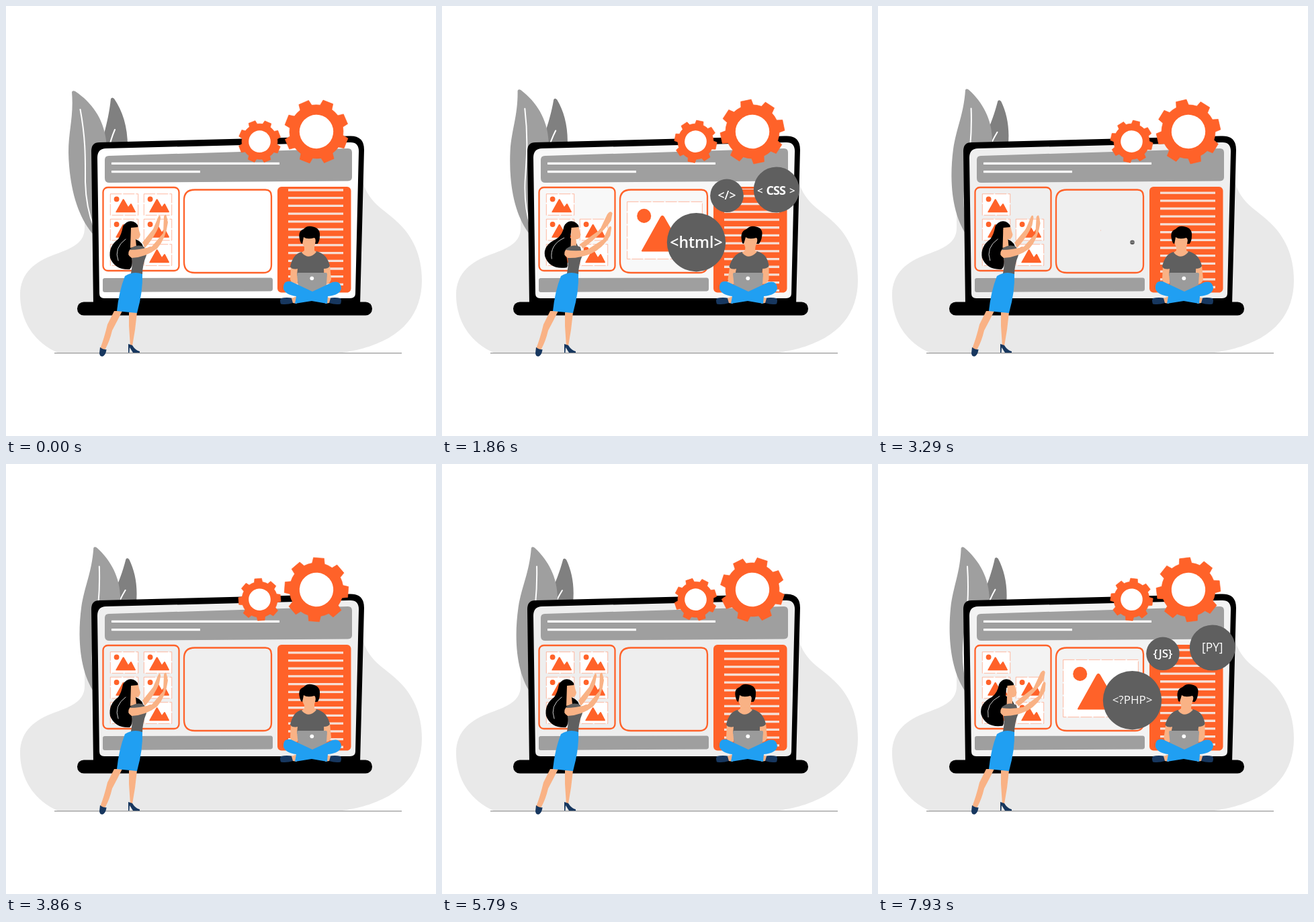
An HTML page that plays this animation: 640x640 px, repeating every 8000 ms.

```html
<!DOCTYPE html>
<html lang="en">
<head>
<meta charset="utf-8">
<title>Building a web page</title>
<style>
  html, body { margin: 0; width: 100%; height: 100%; overflow: hidden; background: #fff; }
  svg { display: block; width: 100vw; height: 100vh; --screen: #fff; }
  .screen { fill: var(--screen); }
  .orange { fill: #ff6229; }
  .grey { fill: #9f9f9f; }
  .shirt, .bubble circle { fill: #5f5f5f; }
  .skin { fill: #f9b285; }
  .blue { fill: #209ff2; }
  .navy { fill: #17375f; }
  .panel { fill: none; stroke: #ff6229; stroke-width: 2.3; }
  .vein { fill: none; stroke: #fff; stroke-width: 2; stroke-linecap: round; }
  .frame { fill: #fff; stroke: #ff9d7c; stroke-width: .7; stroke-dasharray: 17 2; vector-effect: non-scaling-stroke; }
  .bubble text { fill: #fff; text-anchor: middle; font-family: "Open Sans", "Noto Sans", sans-serif; }
  .semi { font-weight: 600; }
  .bubble .tight { font-weight: 700; letter-spacing: -.9px; }
</style>
</head>
<body>
<svg viewBox="0 0 640 640">
  <defs>
    <g id="pic">
      <rect class="frame" x="-20.7" y="-15.8" width="41.4" height="31.6"/>
      <g class="orange">
        <circle cx="-11.4" cy="-8" r="3.9"/>
        <path d="M-12.6 10.8L-2.400 -7.400Q-1.300 -9 -.2 -7.400L6 3.300L9 -.8Q10 -2 11 -.8L17 10.8Q17 11.700 16 11.700H-12Q-13.200 11.700 -12.600 10.800Z"/>
      </g>
    </g>
    <clipPath id="column"><rect x="404" y="272" width="110" height="153"/></clipPath>
  </defs>

  <path fill="#e9e9e9" d="M77 516C40 500 21 466 21 430C21 396 45 380 72 370C100 360 117 352 117 330V300L300 260L531 262C541 294 562 302 582 321C606 343 619 372 619 408C619 464 583 504 500 516Z"/>
  <path d="M72 516.6H589" stroke="#999" stroke-width="1.3"/>

  <g id="backLeaf">
    <path fill="#808080" d="M156 138Q158 135 161 138C174 157 182 182 181 215L160 270L135 240C141 200 152 178 156 138Z"/>
    <path class="vein" d="M162 184Q156 198 152 216"/>
  </g>
  <g id="frontLeaf">
    <path class="grey" d="M98 128Q99 125 103 127C127 143 145 167 149 200Q153 260 135 345C108 320 94 272 93 218C93 185 101 165 98 128Z"/>
    <path class="vein" d="M110.5 154C119 200 118 230 118 262Q119 300 131 330"/>
  </g>

  <path d="M139 203L512 193.5Q533 193 533 214L527 445H130L127 216Q127 203 139 203Z"/>
  <rect x="106" y="440.5" width="439" height="20" rx="9.8"/>
  <path class="screen" d="M149 212L511 203Q526 202 525 218L520 428Q520 435 512 435H146Q139 435 139 428L136 226Q136 212 149 212Z"/>
  <path class="grey" d="M153 223L509 212Q515 212 515 218V255Q515 260 509 260.5L153 263Q147 263 147 256V229Q147 223 153 223Z"/>
  <path d="M157 234.3H407M157 246.7H289" stroke="#fff" stroke-width="3.2"/>
  <path class="grey" d="M147 405L394 404.5Q397 404.5 397 408V421Q397 424 394 424.5L147 426Q144 426 144 423V408Q144 405 147 405Z"/>
  <rect class="panel" x="144.5" y="270" width="113" height="124" rx="7"/>
  <path class="panel" d="M281 273.5H386Q395 273.5 395 283V385Q395 397 383 397H281Q265 397 265 381V289Q265 273.5 281 273.5Z"/>
  <rect class="orange" x="404" y="269" width="109.5" height="157.5" rx="6"/>
  <g clip-path="url(#column)"><path id="lines" stroke="#f6dfd6" stroke-width="3.3"/></g>

  <g id="grid"></g>
  <g id="gears"></g>

  <!-- man -->
  <g id="man">
    <path class="skin" d="M424 387L434 389L434 413Q426 417 423 407ZM473 389L482 386L484 407Q481 416 474 413Z"/>
    <path class="shirt" d="M440 366Q451 372 462 365Q478 369 482 387Q480 391 473 391V401H433L434 391Q426 393 423 388Q427 369 440 366Z"/>
    <path class="skin" d="M444 355H459V364L462 366Q451 379 440 367L444 364Z"/>
    <ellipse class="skin" cx="451" cy="350" rx="9.7" ry="13"/>
    <path d="M439 353Q432 336 443 332Q448 326 457 328.5Q468 331 467 342Q467 350 463.5 354L460 354Q462 347 459 345Q448 348 443 344Q442 350 441 354Z"/>
  </g>
  <path fill="#9b9b9b" d="M435 397H476Q478 397 478 399L476 428H436L433 399Q433 397 435 397Z"/>
  <circle cx="455.3" cy="405.3" r="2.9" fill="#fff"/>
  <path class="navy" d="M409 435Q418 433 427 435V442Q418 445 409 443.5Q407 438 409 435ZM498 435Q489 433 481 435V442Q490 445 498 443.5Q500 438 498 435Z"/>
  <path class="skin" d="M425 435L433 432V443L427 442ZM483 435L475 432V443L481 442Z"/>
  <path class="blue" d="M424 410Q412 408 413 421Q416 430 432 432L430 443L455 439L478 443L479 432Q498 430 499 420Q498 408 486 411L456 425Z"/>

  <!-- woman -->
  <path class="skin" d="M161 454H173Q166 468 158 483Q154 500 147 512L140 510Q146 495 151 474ZM183 456H195L192 482L188 506L185 507L183 476Z"/>
  <path class="navy" d="M140 508Q146 512 149.5 511Q149 518 145 521Q140 523 139 517ZM182 503L188 505Q193 513 199 514V516H189L184 508L183.5 516H182Z"/>
  <path id="hair"/>
  <path class="vein" id="shine" style="stroke-width:.8"/>
  <path class="skin" id="backArm"/>
  <use href="#pic" id="flyer"/>
  <path class="skin" id="face" d="M186 330L197 329Q198 335 200 340Q199 348 193 347L194 358L185 360Z"/>
  <path class="shirt" d="M184 362Q196 353 206 359L209 371Q203 385 203 400Q195 401 186 398Q190 380 184 362Z"/>
  <path class="blue" d="M177 402Q190 394 203 399Q204 425 195 457L165 454Q168 425 177 402Z"/>
  <path class="skin" id="frontArm"/>

  <g id="bubbles"></g>
</svg>
<script>
const LOOP = 8000, CYCLE = 6000, SWAY = 2400;
const LINE_GAP = 11.7, SCROLL = .0048, SPIN = .0305;
const $ = id => document.getElementById(id);
const lerp = (a, b, k) => a + (b - a) * k;
const smooth = u => u * u * (3 - 2 * u);

// Eased value between [time, value] stops.
function keyed(time, stops) {
  if (time <= stops[0][0]) return stops[0][1];
  for (let i = 1; i < stops.length; i++) {
    const [t0, v0] = stops[i - 1], [t1, v1] = stops[i];
    if (time < t1) return lerp(v0, v1, smooth((time - t0) / (t1 - t0)));
  }
  return stops[stops.length - 1][1];
}

// Blend two paths that share the same commands.
function blend([from, to], k) {
  const ends = to.match(/[\d.]+/g);
  let i = 0;
  return from.replace(/[\d.]+/g, n => lerp(+n, +ends[i++], k).toFixed(2));
}

const shapes = {
  hair: [
    "M174 328Q180 318 190 321Q198 325 196 331L186 333L187 345Q202 349 204 358Q192 362 187 373Q190 386 184 392Q162 393 155 375Q152 358 167 347Q172 340 174 328Z",
    "M182 328Q187 318 197 321Q205 325 204 331L193 333L191 345Q200 350 202 358Q190 362 185 372Q188 386 186 389Q160 393 153 372Q150 356 170 347Q180 341 182 328Z"],
  shine: ["M178 347Q160 360 167 379", "M182 345Q160 355 163 376"],
  backArm: [
    "M203 352L219 332L227 313Q230 310 230 316L228 327Q221 344 207 360Z",
    "M205 355L236 333L247 310Q252 303 255 308L253 319Q242 336 210 361Z"],
  frontArm: [
    "M184 363Q200 363 217 358L234 338L235 313Q238 308 239 313L241 322Q238 346 225 361Q208 374 187 375Q179 370 184 363Z",
    "M184 363Q200 366 216 363L240 348L248 332Q252 326 253 331L251 343Q240 361 222 369Q204 376 187 375Q179 370 184 363Z"]
};

const thumb = (col, row) => [176 + col * 50, 295.5 + row * 37.5];
const home = thumb(1, 0), centre = [331.5, 334];
for (let i = 0; i < 6; i++) {
  if (i === 1) continue;
  const [x, y] = thumb(i % 2, i >> 1);
  $("grid").innerHTML += `<use href="#pic" x="${x}" y="${y}"/>`;
}

function gearPath(root, tip) {
  const at = (r, deg) => {
    const a = deg * Math.PI / 180;
    return `${(r * Math.sin(a)).toFixed(2)} ${(-r * Math.cos(a)).toFixed(2)}`;
  };
  let d = "";
  for (let a = 0; a < 360; a += 45) {
    d += `${a ? `A${root} ${root} 0 0 1 ` : "M"}${at(root, a - 13.5)}L${at(tip, a - 9.5)}L${at(tip, a + 9.5)}L${at(root, a + 13.5)}`;
  }
  return d + `A${root} ${root} 0 0 1 ${at(root, -13.5)}Z`;
}

const gears = [
  { x: 377.5, y: 201.7, root: 26.5, tip: 31.7, hole: 16.3, dir: -1 },
  { x: 462, y: 187, root: 40, tip: 48, hole: 25.2, dir: 1 }
].map(g => {
  $("gears").insertAdjacentHTML("beforeend",
    `<g><path class="orange" stroke="#ff6229" stroke-width=".6" stroke-linejoin="round" d="${gearPath(g.root, g.tip)}"/><circle r="${g.hole}" fill="#fff"/></g>`);
  return { ...g, el: $("gears").lastChild };
});

const label = (size, text, cls = "semi", x = 0, y = size * .34) =>
  `<text class="${cls}" x="${x}" y="${y}" font-size="${size}">${text}</text>`;

const bubbles = [
  { x: 424, y: 282.3, r: 24.8, stops: [[200, 0], [550, 1], [2500, 1], [2900, 0]],
    faces: [label(17.5, "&lt;/&gt;"), label(17, "{JS}")] },
  { x: 497.8, y: 273.5, r: 34, stops: [[450, 0], [850, 1], [2750, 1], [3100, 0]],
    faces: [
      label(15, "&lt;", "semi", -24.5, 6) + label(18, "CSS", "tight", -1, 7) + label(15, "&gt;", "semi", 23.5, 6),
      label(17.3, "[PY]", "")] },
  { x: 378.5, y: 351.7, r: 43.7, stops: [[650, 0], [1000, 1], [3000, 1], [3350, 0]],
    faces: [label(23, "&lt;html&gt;"), label(17, "&lt;?PHP&gt;", "")] }
].map(b => {
  $("bubbles").insertAdjacentHTML("beforeend",
    `<g class="bubble"><circle r="${b.r}"/>${b.faces.map(f => `<g>${f}</g>`).join("")}</g>`);
  return { ...b, el: $("bubbles").lastChild };
});

function place(el, x, y, scale) {
  el.setAttribute("transform", `translate(${x} ${y}) scale(${scale})`);
  el.style.display = scale > .004 ? "" : "none";
}

function drawAmbient(t) {
  const sway = (1 - Math.cos(2 * Math.PI * (t + 20) / SWAY)) / 2;
  $("frontLeaf").setAttribute("transform", `rotate(${sway * 9.7} 135 345)`);
  $("backLeaf").setAttribute("transform", `rotate(${sway * 9.7} 144 292)`);
  const light = Math.round(255 - 18 * sway);
  document.querySelector("svg").style.setProperty("--screen", `rgb(${light},${light},${light})`);

  for (const g of gears) {
    const angle = g.dir * (t * SPIN - 23.5);
    g.el.setAttribute("transform", `translate(${g.x} ${g.y}) rotate(${angle})`);
  }

  const shift = t * SCROLL % LINE_GAP;
  let d = "";
  for (let i = -1; i < 13; i++) d += `M420 ${274 + i * LINE_GAP + shift}h82`;
  $("lines").setAttribute("d", d);
}

function drawStory(p, set) {
  for (const b of bubbles) {
    place(b.el, b.x, b.y, keyed(p, b.stops));
    for (let i = 0; i < 2; i++) b.el.children[i + 1].style.display = i === set ? "" : "none";
  }

  const lean = keyed(p, [[400, 0], [1050, 1], [2450, 1], [3050, 0]]) * .105;
  $("man").setAttribute("transform", `matrix(1 0 ${-lean} 1 ${430 * lean} 0)`);

  const reach = keyed(p, [[400, 0], [1180, 1], [1830, 1], [1930, .75], [2750, .75], [3400, 0]]);
  for (const id in shapes) $(id).setAttribute("d", blend(shapes[id], reach));
  $("face").setAttribute("transform", `translate(${keyed(p, [[350, 0], [850, 6.5], [2750, 6.5], [3400, 0]])} 0)`);

  if (p < 3300) {
    const u = keyed(p, [[400, 0], [1260, 1]]);
    const grow = 1 + 1.7 * Math.max(0, (u - .43) / .57);
    place($("flyer"), lerp(home[0], centre[0], u ** 1.75), lerp(home[1], centre[1], u),
      grow * keyed(p, [[3000, 1], [3300, 0]]));
  } else {
    place($("flyer"), ...home, keyed(p, [[3300, 0], [3550, 1]]));
  }
}

const start = performance.now();
function tick(now) {
  const t = Math.max(0, now - start) % LOOP;
  drawAmbient(t);
  drawStory(t % CYCLE, t < CYCLE ? 0 : 1);
  requestAnimationFrame(tick);
}
tick(start);
</script>
</body>
</html>
```
